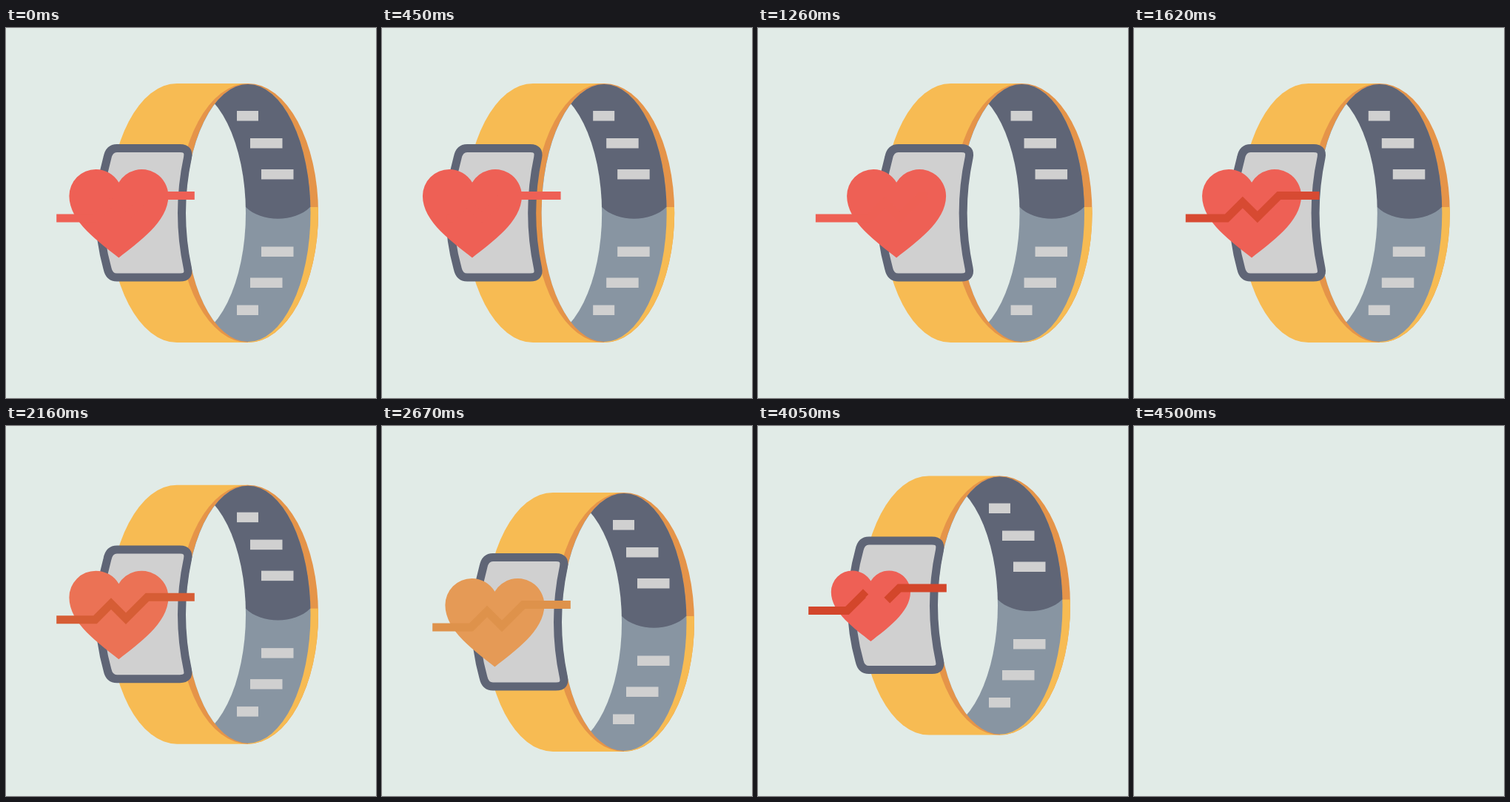
Animation, 500 px wide and 500 px high, one loop 4.53 s. Source, as an HTML page with a canvas:

```html
<!DOCTYPE html>
<html lang="en">
<head>
<meta charset="utf-8">
<title>Fitness band</title>
<style>
  html, body { margin: 0; width: 100%; height: 100%; overflow: hidden; background: #e1ebe7; }
  canvas { display: block; width: 100vw; height: 100vh; }
</style>
</head>
<body>
<canvas id="stage" width="500" height="500"></canvas>
<script>
const ctx = document.getElementById('stage').getContext('2d');
const LOOP = 4530, STEP = 30, BLANK_AT = 4500;
const C = {
  bg: '#e1ebe7', yellow: '#f7bb53', orange: '#e59449',
  slate: '#5f6576', steel: '#8895a2', grey: '#d0d0d0'
};
const RED = [238, 96, 85], DARK_RED = [211, 70, 43];
const AMBER = [229, 154, 86], DARK_AMBER = [222, 146, 75];

// Cubic bezier (.5, 0, .5, 1), solved by bisection
function ease(p) {
  let lo = 0, hi = 1;
  for (let i = 0; i < 24; i++) {
    const m = (lo + hi) / 2;
    if (1.5 * m * (1 - m) + m ** 3 < p) lo = m; else hi = m;
  }
  return lo * lo * (3 - 2 * lo);
}

const mix = (a, b, k) => Array.isArray(a) ? a.map((v, i) => mix(v, b[i], k)) : a + (b - a) * k;

// Eased interpolation through [time, value] keys
function track(t, ...keys) {
  if (t <= keys[0][0]) return keys[0][1];
  for (let i = 1; i < keys.length; i++) {
    const [t0, a] = keys[i - 1], [t1, b] = keys[i];
    if (t < t1) return mix(a, b, ease((t - t0) / (t1 - t0)));
  }
  return keys[keys.length - 1][1];
}

const sway = (t, amount) => track(t, [0, 0], [600, -amount], [1200, amount], [1800, 0]);
const rgb = c => `rgb(${c.map(Math.round).join(',')})`;

function ellipse(x, rx, ry) {
  ctx.beginPath();
  ctx.ellipse(x, 250, rx, ry, 0, 0, Math.PI * 2);
}

function fill(color) {
  ctx.fillStyle = color;
  ctx.fill();
}

function shifted(x, y, draw) {
  ctx.save();
  ctx.translate(x, y);
  draw();
  ctx.restore();
}

function drawBand() {
  ctx.beginPath();
  ctx.ellipse(231, 250, 92, 175, 0, Math.PI / 2, Math.PI * 1.5);
  ctx.lineTo(327, 75);
  ctx.lineTo(327, 425);
  fill(C.yellow);

  ellipse(327, 95, 175);
  fill(C.orange);
  ctx.save();
  ctx.clip();
  ctx.fillStyle = C.yellow;
  ctx.fillRect(327, 242, 100, 190);
  ctx.restore();

  ellipse(327, 84.5, 174);
  fill(C.steel);
  ctx.save();
  ctx.clip();
  ctx.beginPath();
  ctx.moveTo(200, 70);
  ctx.lineTo(200, 242);
  ctx.lineTo(324, 242);
  ctx.bezierCurveTo(345, 263, 390, 263, 411, 242);
  ctx.lineTo(430, 242);
  ctx.lineTo(430, 70);
  fill(C.slate);
  ellipse(239.5, 84.5, 171);
  fill(C.bg);
  ctx.restore();

  ctx.fillStyle = C.grey;
  for (const [x, y, w] of [[312, 112, 29], [330, 149, 43.5], [345, 191, 43.5]]) {
    ctx.fillRect(x, y, w, 13.5);
    ctx.fillRect(x, 486.5 - y, w, 13.5);
  }
}

function drawScreen() {
  ctx.beginPath();
  ctx.moveTo(150, 162.4);
  ctx.lineTo(235, 162.4);
  ctx.quadraticCurveTo(248, 162.4, 245.5, 175);
  ctx.quadraticCurveTo(229.5, 250, 245.5, 325);
  ctx.quadraticCurveTo(248, 337.1, 235, 337.1);
  ctx.lineTo(150, 337.1);
  ctx.quadraticCurveTo(139.5, 337.1, 137, 325);
  ctx.quadraticCurveTo(116, 250, 137, 175);
  ctx.quadraticCurveTo(139.5, 162.4, 150, 162.4);
  ctx.closePath();
  fill(C.grey);
  ctx.lineWidth = 11;
  ctx.strokeStyle = C.slate;
  ctx.stroke();
}

function drawHeart(scale, color) {
  ctx.translate(152.4, 250.5);
  ctx.scale(scale, scale);
  ctx.translate(-152.4, -250.5);
  const notch = Math.acos(31 / 36);
  ctx.beginPath();
  ctx.moveTo(152.4, 310.5);
  ctx.bezierCurveTo(127, 290, 85.4, 262, 85.4, 227);
  ctx.arc(121.4, 227, 36, Math.PI, Math.PI * 2 - notch);
  ctx.arc(183.4, 227, 36, Math.PI + notch, Math.PI * 2);
  ctx.bezierCurveTo(219.4, 262, 178, 290, 152.4, 310.5);
  fill(color);
}

function drawPulse(t, color) {
  const dx = sway(t, 30);
  const left = track(t, [0, 68.2], [600, 90], [1200, 78], [1800, 68.2]);
  const right = track(t, [0, 254.8], [600, 240], [1200, 228], [1800, 254.8]);
  const points = [
    [left, 257], [120.5 + dx, 257], [142 + dx, 235.5],
    [162 + dx, 255.5], [191 + dx, 226.5], [right, 226.5]
  ];
  let length = 0;
  ctx.beginPath();
  points.forEach(([x, y], i) => {
    ctx.lineTo(x, y);
    if (i) length += Math.hypot(x - points[i - 1][0], y - points[i - 1][1]);
  });
  // A gap sweeps along the line once per beat
  if (t >= 2700) {
    const gap = 0.19, head = ease((t % 900) / 900) * (1 + gap);
    const from = Math.max(0, head - gap), to = Math.min(1, head);
    ctx.setLineDash([from * length, (to - from) * length, length + 1, 0]);
  }
  ctx.lineWidth = 11;
  ctx.strokeStyle = color;
  ctx.stroke();
}

function render(t) {
  ctx.fillStyle = C.bg;
  ctx.fillRect(0, 0, 500, 500);
  if (t >= BLANK_AT) return;

  const y = track(t, [1800, 0], [2700, 15], [3600, -15], [4500, 0]);
  const beat = track(t, [2700, 1], [3150, 0.8], [3600, 1], [4050, 0.8], [4500, 1]);
  const heartColor = track(t, [1800, RED], [2700, AMBER], [3150, RED]);
  const lineColor = track(t, [1200, RED], [1800, DARK_RED], [2700, DARK_AMBER], [3150, DARK_RED]);
  const lag = t - 14;

  shifted(sway(t, 30), y, drawBand);
  shifted(sway(lag, 40), y, drawScreen);
  shifted(sway(lag, 35), y, () => drawHeart(beat, rgb(heartColor)));
  shifted(0, y, () => drawPulse(t, rgb(lineColor)));
}

const start = performance.now();
function tick() {
  const t = (performance.now() - start) % LOOP;
  render(Math.floor(t / STEP) * STEP);
  requestAnimationFrame(tick);
}
tick();
</script>
</body>
</html>
```
